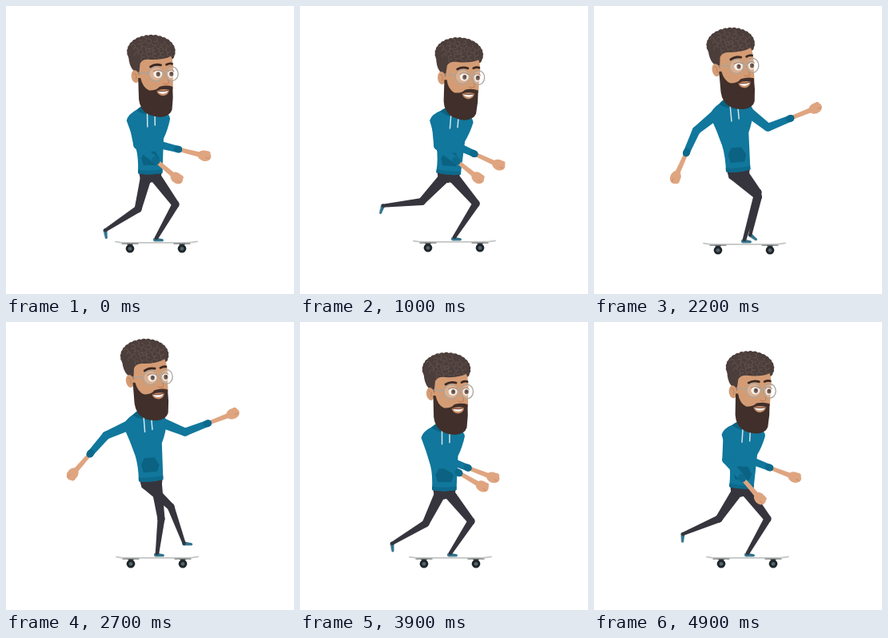
Write an HTML page with a canvas that moves like this. It is 360 by 360 pixels and loops after 5 s.

```html
<!DOCTYPE html>
<html lang="en">
<head>
<meta charset="utf-8">
<title>Skater</title>
<style>
  html, body { margin: 0; height: 100%; overflow: hidden; background: #fff; }
  canvas { display: block; width: 100vw; height: 100vh; }
</style>
</head>
<body>
<canvas id="stage"></canvas>
<script>
const LOOP = 5000, CYCLE = 2000, STEP = 100;
const C = {
  hoodie: '#11779c', dark: '#0b6282', cuff: '#0d6a8c', pants: '#36353d',
  skin: '#dfa580', face: '#d49c74', shade: '#bd835f', hair: '#4c3e3b',
  curl: '#655550', beard: '#402f2a', shoe: '#34758e', metal: '#aaa49c'
};

// time, hip xy, neck xy, rear arm angles, front arm angles,
// standing knee xy, rear leg angles, board offset xy
const POSES = [
  [0,    180, 209, 179, 126,  81,  40, 110,  14, 212, 248, 104, 147, 0, 1],
  [200,  180, 206, 172, 117, 141, 114,  38, -22, 205, 233,  42, 102, 0, 3],
  [600,  181, 195, 169, 108, 187, 172, -12, -44, 188, 245,   2,  27, 0, 0],
  [700,  181, 198, 174, 111, 156, 131,  22, -21, 194, 246,  43,  70, 1, 0],
  [800,  183, 203, 183, 118, 126,  90,  90,   8, 206, 246,  84, 114, 3, 0],
  [900,  184, 207, 189, 126,  95,  49, 117,  21, 217, 246, 124, 157, 4, 0],
  [1100, 186, 211, 193, 130,  85,  36, 126,  25, 221, 248, 134, 180, 5.5, 0],
  [1500, 183, 211, 188, 129,  75,  34, 124,  22, 219, 249, 126, 165, 3, 0],
  [1900, 180, 210, 180, 128,  68,  30, 120,  21, 214, 249, 116, 149, 0, 0]
];

const canvas = document.getElementById('stage');
const g = canvas.getContext('2d');
const dpr = window.devicePixelRatio || 1;
canvas.width = canvas.height = 360 * dpr;

const rad = d => d * Math.PI / 180;
const polar = (p, deg, len) => [p[0] + len * Math.cos(rad(deg)), p[1] + len * Math.sin(rad(deg))];

// Cyclic key lookup: time and value of one channel
function key(i, ch) {
  const n = POSES.length, row = POSES[(i + n) % n];
  return [row[0] + Math.floor(i / n) * CYCLE, row[ch]];
}

function slope(i, ch) {
  const a = key(i - 1, ch), b = key(i + 1, ch);
  return (b[1] - a[1]) / (b[0] - a[0]);
}

// Smooth cubic through the keys
function value(t, ch) {
  let i = POSES.length - 1;
  while (POSES[i][0] > t) i--;
  const [t0, v0] = key(i, ch), [t1, v1] = key(i + 1, ch);
  const h = t1 - t0, u = (t - t0) / h, w = 1 - u;
  return v0 * (1 + 2 * u) * w * w + v1 * u * u * (3 - 2 * u)
    + h * u * w * (slope(i, ch) * w - slope(i + 1, ch) * u);
}

function fill(d, color) {
  g.fillStyle = color;
  g.fill(new Path2D(d));
}

function line(d, color, width) {
  g.strokeStyle = color;
  g.lineWidth = width;
  g.stroke(new Path2D(d));
}

function oval(x, y, rx, ry, color, turn = 0) {
  g.fillStyle = color;
  g.beginPath();
  g.ellipse(x, y, rx, ry, turn, 0, 7);
  g.fill();
}

// Limb segment with round ends and two widths
function taper(a, b, wa, wb, color) {
  const n = Math.atan2(b[1] - a[1], b[0] - a[0]) + Math.PI / 2;
  const c = Math.cos(n) / 2, s = Math.sin(n) / 2;
  g.fillStyle = color;
  g.beginPath();
  g.moveTo(a[0] + c * wa, a[1] + s * wa);
  g.lineTo(b[0] + c * wb, b[1] + s * wb);
  g.lineTo(b[0] - c * wb, b[1] - s * wb);
  g.lineTo(a[0] - c * wa, a[1] - s * wa);
  g.fill();
  oval(...a, wa / 2, wa / 2, color);
  oval(...b, wb / 2, wb / 2, color);
}

function arm(shoulder, upper, lower) {
  const elbow = polar(shoulder, upper, 33);
  const cuff = polar(elbow, lower, 31);
  const hand = polar(elbow, lower, 64);
  taper(cuff, hand, 5, 6.5, C.skin);
  oval(...hand, 8.5, 6.6, C.skin, rad(lower));
  oval(...polar(hand, lower - 50, 5.5), 3.2, 2.6, C.skin, rad(lower));
  line(`M${polar(hand, lower + 35, 3)}L${polar(hand, lower + 15, 7)}`, C.shade, 0.7);
  taper(shoulder, elbow, 13, 10, C.hoodie);
  taper(elbow, cuff, 10, 8, C.hoodie);
  taper(polar(elbow, lower, 29), cuff, 8.6, 8.6, C.cuff);
}

function shoe(ankle, deg) {
  const toe = polar(ankle, deg, 9);
  taper(ankle, toe, 5, 3, C.shoe);
  line(`M${polar(ankle, deg + 90, 2.4)}L${polar(toe, deg + 90, 1.8)}`, '#b9c6ca', 0.8);
}

function board(dx, dy) {
  g.save();
  g.translate(dx, dy);
  line('M137 293.6Q143 294.8 150 294.8H226Q233 294.8 239 293.4', '#c3c5c5', 1.8);
  line('M145 296.2H165M210 296.2H230', '#77797a', 1.2);
  for (const x of [155, 220]) {
    fill(`M${x - 4} 296h8l-2 4h-4z`, '#555b5e');
    oval(x, 302.3, 5.3, 5.3, '#1f2529');
    oval(x, 302.3, 2.4, 2.4, '#53646b');
  }
  g.restore();
}

function torso() {
  fill('M165 129Q172 123 179 123L196 131Q205 134 206 141Q203 155 197.5 166L195.5 209Q180 212 165 209Q166 190 163 178Q158 160 151.5 143Q153 135 165 129Z', C.hoodie);
  fill('M165 204.5Q180 207 195.7 204.5L195.5 209Q180 212 165 209Z', C.cuff);
  fill('M174 182H187L192 191L189 199H172L169.5 190Z', C.dark);
  fill('M164 130Q171 123 180 124L200 133Q189 140 179 136Q171 135 164 130Z', C.dark);
  line('M177.5 134V151M187 137V149', '#d7e4e8', 1.5);
}

function eye(x, rx) {
  oval(x, 85, rx, 5, '#f4efea');
  oval(x + 0.6, 85.3, 2.6, 3, '#59392a');
  oval(x + 1, 84.7, 1, 1.2, '#1c1412');
  line(`M${x - rx} 82Q${x} 78.5 ${x + rx} 82`, '#8a5b42', 1);
}

function lens(x, rx) {
  oval(x, 85, rx, 8.8, 'rgba(255,255,255,.2)');
  g.strokeStyle = C.metal;
  g.lineWidth = 1.3;
  g.beginPath();
  g.ellipse(x, 85, rx, 8.8, 0, 0, 7);
  g.stroke();
}

function hair() {
  oval(182, 57, 27, 18, C.hair);
  fill('M155 58H175L170 92L166 94L162 82Q156 79 154 67Z', C.hair);
  for (let i = 0; i < 19; i++) {
    const a = rad(160 + i * 12.2);
    oval(182 + 26 * Math.cos(a), 57 + 17 * Math.sin(a), 4.4, 4.2, C.hair);
  }
  for (let i = 0; i < 30; i++) {
    const a = i * 2.4, r = Math.sqrt(i / 30);
    const x = 182 + 26 * r * Math.cos(a), y = 54 + 14 * r * Math.sin(a);
    g.strokeStyle = C.curl;
    g.lineWidth = 0.9;
    g.beginPath();
    g.arc(x, y, 2.8, a, a + 3.6);
    g.stroke();
  }
}

function head() {
  hair();
  fill('M168 72Q171 66 180 67Q196 68 207 63Q211 74 209 88L209 104Q195 116 176 110L166 92Z', C.face);
  oval(162, 88, 5, 8, C.face, -0.15);
  line('M160 84Q164 84 163 91', C.shade, 1);
  fill('M165.5 90L168.5 90Q171 102 179 105.5Q188 106 192 101Q201 98.5 208.5 101Q209.5 115 207.5 130Q205 138 193 139Q178 138 172 131Q165.5 124 166 110Z', C.beard);
  fill('M188.5 106Q196 103 204 105Q204 111 197 112.5Q190 112 188.5 106Z', '#c68c69');
  fill('M190 106.5Q197 107.5 203 106Q201 110 196.5 110Q192 110 190 106.5Z', '#f7f3ee');
  line('M190 106.3Q197 107.5 203 105.8', '#65362c', 0.9);
  eye(190, 5.4);
  eye(206.5, 3.8);
  line('M200 86Q205 95 203 97Q200 99 197 97', C.shade, 1.2);
  line('M181 76Q187 72 194 74M201 73.5Q205 71.5 208 72.5', '#3b2924', 2.8);
  line('M179 84L166 83M197 84Q199 82 200.5 84', C.metal, 1.3);
  lens(188, 9);
  lens(208, 7.5);
}

function draw(t) {
  const [hx, hy, nx, ny, ra, rb, fa, fb, kx, ky, la, lb, dx, dy] =
    POSES[0].slice(1).map((_, i) => value(t, i + 1));
  const lean = Math.atan2(nx - hx, hy - ny);
  const stretch = Math.hypot(nx - hx, hy - ny) / 83;
  const cos = Math.cos(lean), sin = Math.sin(lean);
  const local = (x, y) => [hx + x * cos - y * stretch * sin, hy + x * sin + y * stretch * cos];

  g.setTransform(dpr, 0, 0, dpr, 0, 0);
  g.fillStyle = '#fff';
  g.fillRect(0, 0, 360, 360);
  g.lineCap = g.lineJoin = 'round';

  board(dx, dy);
  arm(local(18, -68), fa, fb);

  // Legs
  const knee = [kx, ky], ankle = [188 + dx, 289 + dy];
  shoe([ankle[0] - 1.5, ankle[1] + 2], 5);
  taper([hx + 7, hy + 5], knee, 14, 9, C.pants);
  taper(knee, ankle, 9, 4.6, C.pants);
  const hip = [hx - 5, hy + 5];
  const knee2 = polar(hip, la, 41), foot = polar(knee2, lb, 49);
  shoe(foot, lb - 65);
  taper(hip, knee2, 14, 9, C.pants);
  taper(knee2, foot, 9, 4, C.pants);
  const corners = [local(-14, -2), local(15, -2), local(13, 8), local(0, 12), local(-12, 8)];
  fill('M' + corners.join('L') + 'Z', C.pants);

  g.save();
  g.translate(hx, hy);
  g.rotate(lean);
  g.scale(1, stretch);
  g.translate(-180, -209);
  torso();
  g.restore();

  arm(local(-20, -68), ra, rb);

  g.save();
  g.translate(nx, ny);
  g.rotate(lean * 0.7);
  g.translate(-179, -126);
  head();
  g.restore();
}

const start = performance.now();
function tick(now) {
  const t = Math.max(0, now - start) % LOOP;
  draw(Math.floor(t / STEP) * STEP % CYCLE);
  requestAnimationFrame(tick);
}
tick(start);
</script>
</body>
</html>
```
